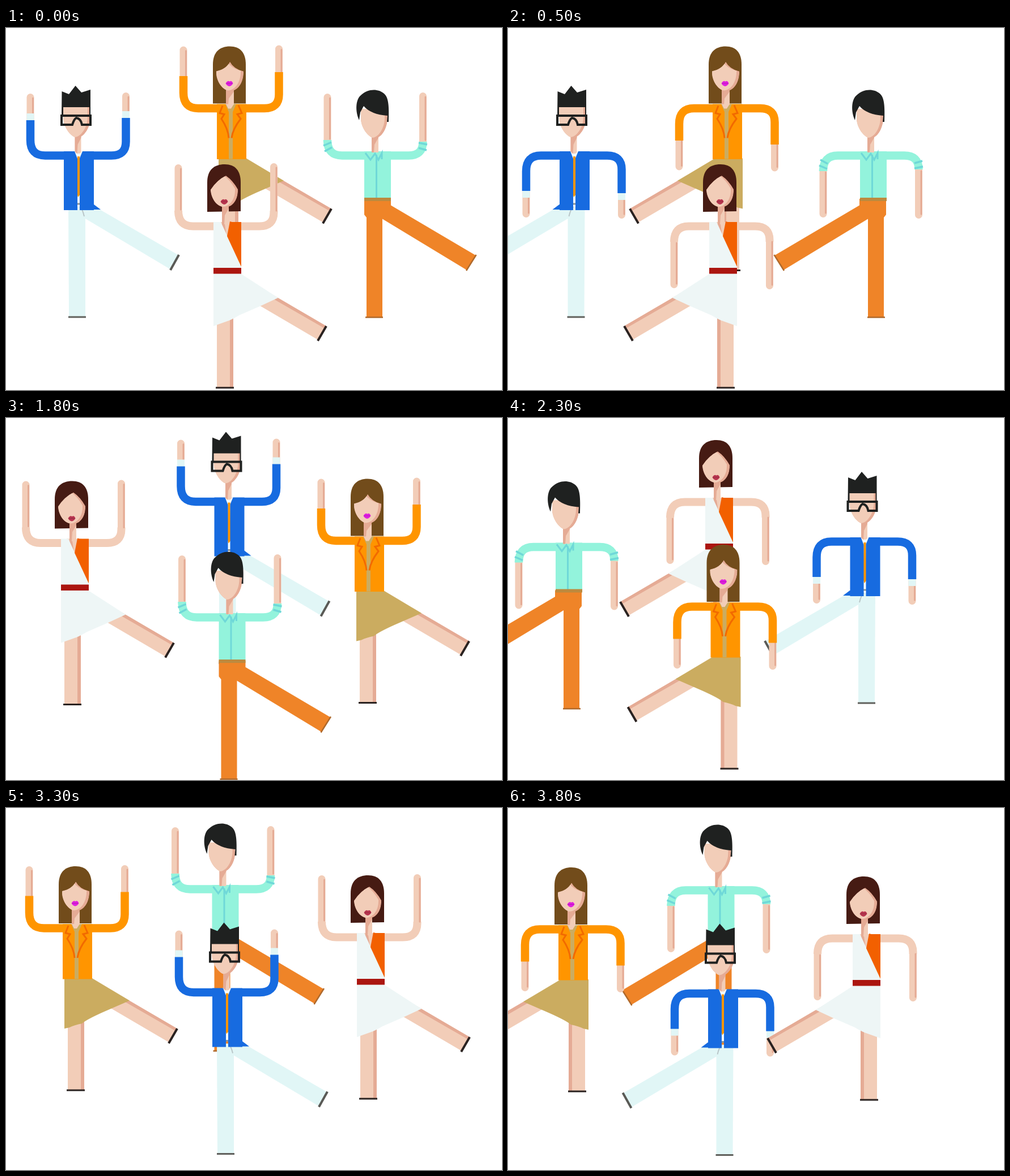
These frames come from a looping animation (875 by 640 pixels, 4300 ms). An HTML page with a canvas:

```html
<!DOCTYPE html>
<html>
<head>
<meta charset="utf-8">
<title>Dancers</title>
<style>
  html, body { margin: 0; width: 100%; height: 100%; overflow: hidden; background: #fff; }
  canvas { display: block; }
</style>
</head>
<body>
<canvas id="stage" width="875" height="640"></canvas>
<script>
const ctx = document.getElementById('stage').getContext('2d');
const SKIN = '#f2cdb8', SHADE = '#e5ab95', BLACK = '#1f2120';
const BLUE = '#176be0', PALE = '#e1f6f6', ORANGE = '#ff9500', TAN = '#cbac60';
const IVORY = '#eef6f6', MINT = '#93f3dc', STRIPE = '#6fd8d8', RUST = '#ef8428';

function fill(color, path) {
  ctx.fillStyle = color;
  ctx.fill(new Path2D(path));
}

function line(color, width, path, cap = 'butt') {
  ctx.strokeStyle = color;
  ctx.lineWidth = width;
  ctx.lineCap = cap;
  ctx.stroke(new Path2D(path));
}

function within(setup, draw) {
  ctx.save();
  setup();
  draw();
  ctx.restore();
}

const shifted = (x, y, draw) => within(() => ctx.translate(x, y), draw);

// Both arms as one line, from the left end height to the right end height
const armPath = (left, right) =>
  `M-59,${left} V-20 Q-59,7.5 -33,7.5 H84 Q109.5,7.5 109.5,-17 V${right}`;

function bareArms() {
  line(SKIN, 13, armPath(-95.5, -97.5), 'round');
  line(SHADE, 3, 'M-54.5,-94 V-22 M114,-96 V-20', 'round');
}

function face(path) {
  within(() => ctx.clip(new Path2D(path)), () => {
    fill(SHADE, path);
    ctx.translate(-5, -1);
    fill(SKIN, path);
  });
}

function neck(x, top, bottom, width = 12) {
  fill(SKIN, `M${x},${top} h${width} V${bottom} h${-width} Z`);
  fill(SHADE, `M${x},${top} h${width} v8 L${x + 5},${top + 20} L${x + 4},${bottom} H${x} Z`);
}

function lips(color, x, y) {
  shifted(x, y, () => {
    fill(color, 'M-7,0 Q-4,-5 -1,-4 Q0,-3 1,-4 Q4,-5 6,0 Q3,5 -1,5 Q-5,4 -7,0 Z');
    line('#0003', 1, 'M-6,0 H5');
  });
}

function bareLegs() {
  fill(SKIN, 'M6,160 H35 V292 H6 Z M100,126 L199,184 L184,208 L70,141 Z');
  fill(SHADE, 'M29,160 H35 V292 H29 Z M100,126 L199,184 L196,188 L97,131 Z');
  line('#2a2220', 3, 'M4,293 H36');
  line('#2a2220', 4, 'M199,184 L184,210');
}

// Origin of each figure: left edge of the torso at shoulder height
const figures = {
  blue: {
    axis: 20.75, armX: 0,
    lower() {
      fill(PALE, 'M8,98 H55 L203,184 L187,208 L38,119 V292 H9 Z');
      fill(BLUE, 'M40,94 H53 L65,103 H40 Z');
      line('#b9c6c8', 2, 'M28,98 Q33,102 36,115');
      line('#60605c', 3, 'M8,293 H39');
      line('#5a5a56', 4, 'M203,183 L188,210');
    },
    arms() {
      bareArms();
      line(PALE, 13, armPath(-67, -71));
      line(BLUE, 14.5, armPath(-55, -59));
    },
    upper() {
      fill('#f4fafa', 'M18,0 H34 V92 H22 Z');
      line('#8b9292', 3, 'M22,93 H32');
      neck(19.5, -32, 4, 11);
      fill('#f4fafa', 'M18,-1 L25,6 L33,0 L31,14 H20 Z');
      fill(ORANGE, 'M24,9 H28 L29,76 L25,81 L23,74 Z');
      fill(BLUE, 'M0,0 H19 L24,13 V104 H0 Z M53,0 H33 L28,12 V104 H53 Z');
    },
    head() {
      face('M-1,-82 H47 V-60 C47,-40 34,-24 24,-24 C13,-24 -1,-42 -1,-60 Z');
      fill(BLACK, 'M-4,-62 L-3.5,-106 L9,-101 L20.5,-116 L31,-104 L47,-109 V-62 H45 V-78 H-1 V-62 Z');
      line(BLACK, 4, 'M-4,-63 H47 V-47 H32 Q30,-58 22,-59 Q18,-57 15,-47 H-4 Z');
    }
  },

  amber: {
    axis: 22.5, armX: 0,
    lower() {
      shifted(3, 1, bareLegs);
      fill(TAN, 'M3,96 H52 L118,135.5 L71,156 Q42,169 34,176 Q20,179 12,183 L3,185 Z');
    },
    arms() {
      bareArms();
      line(ORANGE, 14.5, armPath(-49.5, -56.5));
    },
    upper() {
      fill(ORANGE, 'M0,0 H52 V97.5 H0 Z');
      fill(TAN, 'M15,0 H34 L28,14 V97 H21 V14 Z');
      line('#f26a00', 3, 'M10,3 L5,16 L13,18 L8,26 Q20,44 21,60 M38,2 L44,16 L36,18 L42,26 Q28,44 26,60');
    },
    head() {
      fill('#724c1b', 'M-7,-1 V-70 C-7,-92 5,-102 23,-102 C41,-102 51,-91 51,-70 V-1 Z');
      neck(16, -30, 1, 14);
      fill(SKIN, 'M16,0 H30 L25,8 H20 Z');
      face('M-1,-58 Q17,-62 23,-75 Q30,-62 47,-58 C48,-40 38,-23 24,-23 C11,-23 -2,-40 -1,-58 Z');
      lips('#e01ee0', 22.5, -36.5);
    }
  },

  ivory: {
    axis: 19, armX: -3,
    lower() {
      bareLegs();
      fill(IVORY, 'M0,90 H46 L114,134 L84,148 L45,165 Q35,171 28,174 Q14,179 0,184 Z');
    },
    arms() {
      line(SKIN, 14, armPath(-20, -20));
      bareArms();
    },
    upper() {
      fill(SKIN, 'M10,0 H36 V40 H10 Z');
      neck(15, -32, 14);
      fill(SHADE, 'M15,4 H20 L23,24 Z');
      fill(IVORY, 'M0,0 H13 L49,78 V83 H0 Z');
      fill('#f26000', 'M29,-1 L33,0 H49 V79 L24,25 Z');
      fill('#ab1610', 'M0,81 H49 V91.5 H0 Z');
    },
    head() {
      fill('#461b13', 'M-11,-18 V-70 C-11,-92 1,-102 20,-102 C38,-102 48,-91 48,-70 V-19 Z');
      neck(15, -32, 4);
      face('M-5,-57 Q6,-74 22,-82 Q34,-74 43,-58 C44,-40 34,-26 21,-26 C7,-26 -4,-40 -5,-57 Z');
      lips('#b8354f', 19.5, -36);
    }
  },

  mint: {
    axis: 17.5, armX: -6,
    lower() {
      fill(RUST, 'M0,84 H47 V95.5 L197.5,184.5 L181,210 L32,119.5 V293 H4 V117 L0,112 Z');
      line('#b06a2c', 2.5, 'M2,293.5 H33 M197.5,183 L180,211');
    },
    arms() {
      bareArms();
      line(MINT, 14.5, armPath(-17, -17));
      line(STRIPE, 3.5, 'M-66,-10 L-52,-16 M-64,0 L-51,-7 M102,-15 L117,-12 M102,-6 L116,-2');
    },
    upper() {
      fill(MINT, 'M0,0 H47 V83 H0 Z');
      line(STRIPE, 3, 'M21.5,6 V83');
      fill('#bd8a3e', 'M0,82 H47 V88 H0 Z');
      neck(13, -32, 2);
      line(STRIPE, 3, 'M2,3 L11,15 L19,4 L25,15 L31,3 V14');
    },
    head() {
      face('M-6,-75 H41 V-58 C41,-40 30,-23 19,-23 C8,-23 -7,-42 -6,-60 Z');
      fill(BLACK, 'M-9,-55 C-16,-70 -16,-92 -5,-100 C5,-110 24,-112 35,-102 C43,-95 44,-80 43,-52 L40,-52 L41,-63 Q12,-65 -1,-80 L-7,-69 Z');
    }
  }
};

// Back to front; dip is the drop of the arms-down pose
const formations = {
  first: { dip: 0, cast: [['amber', 372, 134.5], ['blue', 102, 218], ['ivory', 366, 343], ['mint', 632, 218]] },
  second: { dip: 0, cast: [['blue', 367.5, 140.5], ['ivory', 97, 213.5], ['mint', 375.5, 345], ['amber', 615, 209.5]] },
  third: { dip: 0, cast: [['ivory', 359, 141], ['mint', 95, 220.5], ['blue', 614.5, 211], ['amber', 368.5, 326]] },
  fourth: { dip: 2, cast: [['mint', 363.5, 136], ['amber', 100, 205], ['blue', 364, 318.5], ['ivory', 619, 221]] }
};

const LOOP = 4300;
const steps = [
  [0, 'first', true], [500, 'first', false],
  [1000, 'second', false], [1800, 'second', true],
  [2300, 'third', false], [2800, 'third', true],
  [3300, 'fourth', true], [3800, 'fourth', false]
];

function drawFigure({ axis, armX, lower, arms, upper, head }, armsUp) {
  within(() => { if (!armsUp) ctx.transform(-1, 0, 0, 1, 2 * axis, 0); }, lower);
  shifted(armsUp ? 0 : -11, 0, () => {
    within(() => {
      ctx.translate(armX, 0);
      if (!armsUp) ctx.transform(1, 0, 0, -1, 0, 15);
    }, arms);
    upper();
    head();
  });
}

function render(now) {
  const time = now % LOOP;
  const [, name, armsUp] = steps.findLast(([start]) => start <= time);
  const { dip, cast } = formations[name];
  ctx.fillStyle = '#fff';
  ctx.fillRect(0, 0, 875, 640);
  for (const [who, x, y] of cast) {
    shifted(x, y + (armsUp ? 0 : dip), () => drawFigure(figures[who], armsUp));
  }
}

const begin = performance.now();
function tick() {
  render(performance.now() - begin);
  requestAnimationFrame(tick);
}
tick();
</script>
</body>
</html>
```
